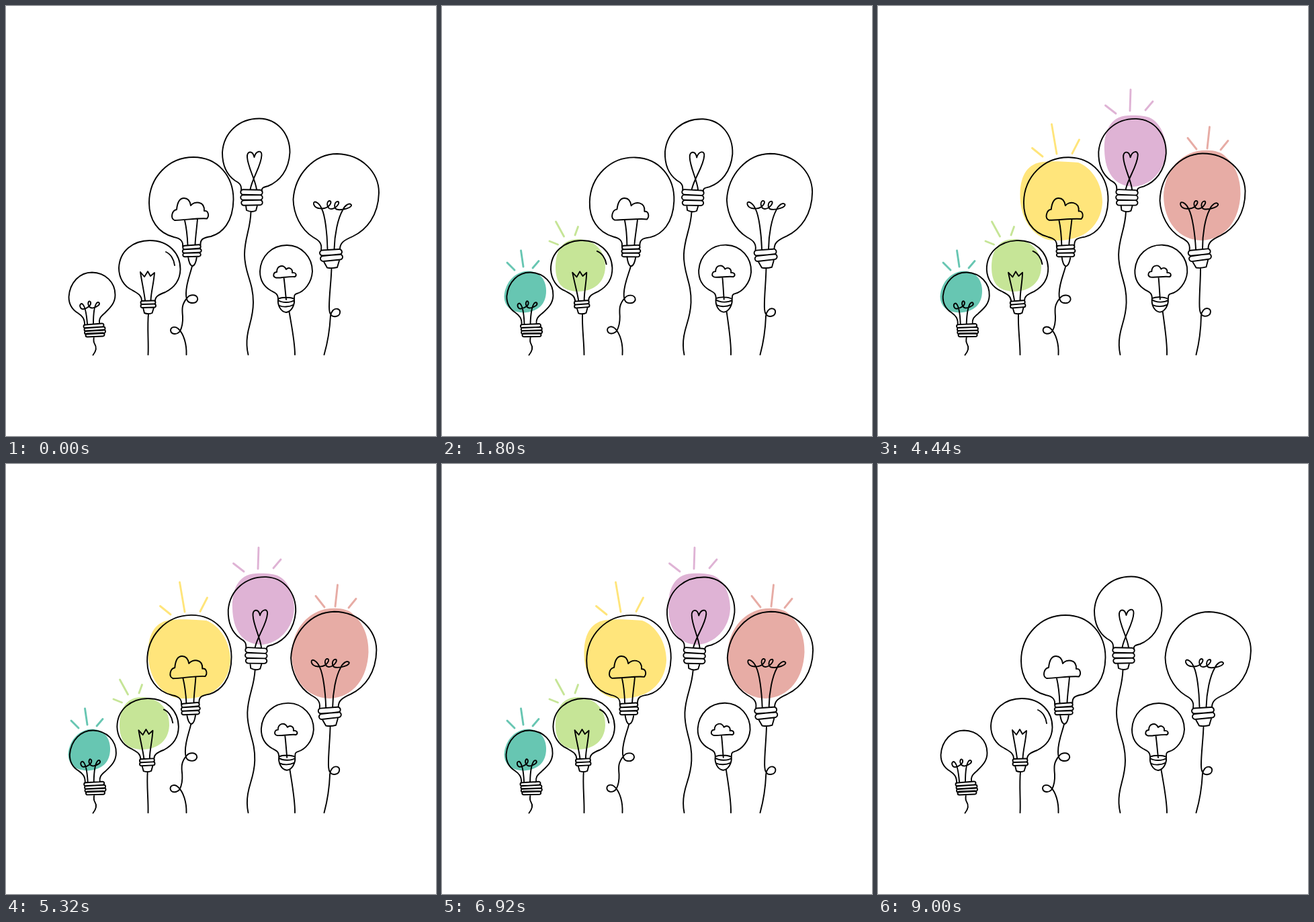
Write an HTML page with a canvas that moves like this. It is 640x640 px and loops after 9040 ms.

```html
<!DOCTYPE html>
<html lang="en">
<head>
<meta charset="utf-8">
<title>Swaying bulbs</title>
<style>
html, body { margin: 0; width: 100%; height: 100%; overflow: hidden; background: #fff; }
canvas { display: block; width: 640px; height: 640px; }
</style>
</head>
<body>
<canvas id="stage" width="640" height="640"></canvas>
<script>
const ctx = document.getElementById('stage').getContext('2d');
const LOOP = 9040, END = 9000, SWING = 1500, GROUND = 519;

// Each bulb: foot x, lean in degrees every SWING ms, outline, socket rings [x1, y1, x2, y2, height].
const bulbs = [
  {
    foot: 130,
    lean: [0, 2.1, 0, 2.1, 0, 2, 0],
    lines: `M117 475C117.5 465 113 461 107 457C97 451 93.5 442 93.5 433C95 411 110 396.5 128 396.5
      C148 397 162.5 411 162.5 430C162.5 443 154 450 147 457C140 463 138 466 139 473
      M121 473C120 460 118 446 113 443C108 443 110 452 115 451C121 450 127 446 126 441
      C124 437 121 441 123 446C126 452 133 449 137 446C141 443 138 439 135 442C131 447 130 460 130 473
      M131 492C130 497 130 500 132 503C136 509 133 515 129.5 519.5`,
    rings: [[118, 477, 143, 475, 5], [119, 481.5, 145, 480, 5], [119.5, 486, 145.5, 484.5, 5], [121, 490, 144, 489, 5]]
  },
  {
    foot: 211.5,
    lean: [0, -3, 0, -2.8, 0, -1.7, 0],
    lines: `M202 439C202 430 196 428 188 423C175 417 168 404 168 390C169 364 190 349 214 349
      C242 349 259.5 368 259.5 392C259 410 249 420 237 426C226 430 222 433 222 439
      M238 366C245 369 250 377 251 386
      M207 438C205.500 425 202 410 200 396L206 403L211 395L215 402L221 397C220 412 216 425 215.5 438
      M204 449L206 457C210 458.5 214 458.5 217.5 457L220 449
      M212 458C210 478 212.5 500 211.5 519`,
    rings: [[203, 441.5, 220, 441, 5], [203, 446.5, 220.5, 446, 5]]
  },
  {
    foot: 268.5,
    lean: [0, 2, -1, 1, -2, 1.8, 0],
    lines: `M263 358C264 350 260 346 250 344C226 338 213 318 213 293C213 255 242 225 279 225
      C315 225 338.5 253 338.5 288C338 322 322 338 305 343C293 345 289 347 289.5 356
      M251 319C244 316 247 304 254 303C255 292 258 286 265 286C272 286 274 291 275 297
      C280 290 296 290 295 305C301 304 303 312 299 316.5C290 315 263 319 251 319
      M266 319C269 332 270 344 270.5 356M285 317C284 330 282 343 281.5 355
      M271 373C272 380 274 386 277 387C281 387 283 380 284 373
      M277 387C275 397 268 412 268 428C268 440 272 442 278 442C284 442 286 437 285 434.5
      C283 429 274 429 270 434C261 444 262 452 263 462C263.5 472 262 478 259 484
      C254 490 246 489 245 483C245 478 251 476 256 480C265 488 269 504 268.5 519`,
    rings: [[266, 359.5, 287, 358, 5.5], [265.5, 365, 288, 364, 5.5], [266, 370.5, 287, 370, 5.5]]
  },
  {
    foot: 360.5,
    lean: [0, 2, 0.85, 1.2, 2, 2.7, 0],
    lines: `M350 275C351 266 347 263 341 260C328 251 322 237 322 218C324 188 347 167.5 377 167.5
      C404 168 422.5 190 422.5 218C421 245 407 261 390 268C382 270 380 271 381 276
      M373 273C371 258 360 240 359 225C358 216 367 214 369.5 225C372 215 381 214 380.5 222
      C380 238 367 255 363.5 273
      M357 297L358 304C363 306.5 368 306.5 372 304.5L374 297
      M364.5 306C364 332 355 345 355 370C355 398 368 410 368 441C368 470 357 480 358.5 505
      C358.7 510 359.5 515 360.5 519`,
    rings: [[353, 277, 378, 277.5, 7.5], [353, 285, 378, 285, 7.5], [354, 293, 378, 292.5, 7.5]]
  },
  {
    foot: 474,
    lean: [0, -1, 0, -2, 0, -1, 0],
    lines: `M469 363C471 352 464 348 457 344C438 332 428 309 427.5 288C430 250 459 220 493 220
      C530 221 555 248 555 278C554 312 537 333 516 343C502 349 497 353 497 362
      M478.5 362C478 338 475 312 470 302C466 292 457 288 458 295C460 303 474 303 480 298
      C485 293 484 290 481 290C476 292 478 303 485 302C492 301 498 292 494 291
      C488 291 487 303 494 303C502 304 515 300 514 296C511 292 504 297 501 304C494 316 489 340 488.5 362
      M473 380.5L478 389.5C483 390.5 489 390 493 389L496 379
      M484.5 390C484 410 481 430 481 448C481 460 485 463 491 462C498 461 499 453 494 451
      C488 449 484 455 483 461C482 480 479 500 473.5 519`,
    rings: [[471, 367.5, 496, 366, 8], [472, 376, 497, 373.5, 8]]
  },
  {
    foot: 430,
    lean: [0, 2.1, 0, 2, 0, 1.8, 0],
    lines: `M405 437C405 428 401 427 395 424C384 418 378 408 378 395C379 372 396 356 418 356
      C440 356 456 374 456 395C455 412 444 425 433 428C429 429 429 431 429 436
      M402 404.5C396 403 398 396 403 396C403 386 413 384 417 392C421 388 427 391 426 397
      C432 396 433 401 430 403C422 402 410 405 402 404.5
      M413.5 404C415 415 416 428 417 437
      M405 436C411 433 423 433 429 436M405 436C404 444 408 455 417 456C425 455 430 445 429 436
      M405 438C411 442 423 442 429 438M407 446C412 448.5 422 448 427 445
      M421.5 455C425 476 430 500 430 519`,
    rings: []
  }
];

// Colour patches with their rays, in order of lighting up.
const glows = [
  {
    on: 520, color: '#67c6b2',
    blob: `M92.5 432C94 410 110 395 128 394.5C146 395 155 408 155 424C155 444 143 455 122 456.5
      C106 456 93 450 92.5 432Z`,
    rays: 'M97 382L108 393M117.5 364L121 388M144 379.5L135 390'
  },
  {
    on: 1210, color: '#c6e597',
    blob: `M169 388C169 362 181 347 202 347C227 348 243 363 243 389C242 412 226 424.5 202 425
      C178 424 169 412 169 388Z`,
    rays: 'M169.5 321L181.5 343M202.5 328.5L198 341M160 350L172.5 355'
  },
  {
    on: 1900, color: '#ffe57b',
    blob: `M211.5 280C212 250 224 234 246 232C262 230 288 232 298 233C318 240 334 265 334 292
      C333 318 317 336 300 343C285 349 263 351 250 347C226 338 211 312 211.5 280Z`,
    rays: 'M229.5 211.5L245 224M258.5 176L266 220M299.5 199L289 219.5'
  },
  {
    on: 2590, color: '#dfb3d5',
    blob: `M337 215C336 190 344 164 372 163C385 162.5 398 163 406 167C420 174 429 195 429 215
      C428 245 405 268 380 269C352 268 338 248 337 215Z`,
    rays: 'M338.5 148L354 160M376 124.5L375 156M409 142L398 155'
  },
  {
    on: 3280, color: '#e7aca5',
    blob: `M425 283C426 250 445 223 475 216C492 213 510 215 518 225C532 237 540 258 539.5 280
      C538 318 518 347 482 349C446 348 426 320 425 283Z`,
    rays: 'M461 196.5L474 213M493.5 180L490 212M521 200.5L510 214'
  }
];

function addRing(path, [x1, y1, x2, y2, h]) {
  const r = h / 2, a = Math.atan2(y2 - y1, x2 - x1);
  const ring = new Path2D();
  ring.arc(x1, y1, r, a + Math.PI / 2, a + Math.PI * 1.5);
  ring.arc(x2, y2, r, a - Math.PI / 2, a + Math.PI / 2);
  ring.closePath();
  path.addPath(ring);
}

for (const b of bulbs) {
  b.path = new Path2D(b.lines);
  b.rings.forEach(r => addRing(b.path, r));
}
for (const g of glows) {
  g.blobPath = new Path2D(g.blob);
  g.rayPath = new Path2D(g.rays);
}

function leanAt(keys, t) {
  const p = Math.min(t, END) / SWING;
  const i = Math.min(Math.floor(p), keys.length - 2);
  const ease = (1 - Math.cos(Math.PI * (p - i))) / 2;
  return keys[i] + (keys[i + 1] - keys[i]) * ease;
}

function draw(t) {
  ctx.fillStyle = '#fff';
  ctx.fillRect(0, 0, 640, 640);
  ctx.lineCap = ctx.lineJoin = 'round';

  ctx.lineWidth = 2.9;
  for (const g of glows) {
    if (t < g.on || t >= END) continue;
    ctx.fillStyle = ctx.strokeStyle = g.color;
    ctx.fill(g.blobPath);
    ctx.stroke(g.rayPath);
  }

  ctx.lineWidth = 1.9;
  ctx.strokeStyle = '#000';
  for (const b of bulbs) {
    ctx.save();
    ctx.translate(b.foot, GROUND);
    ctx.rotate(leanAt(b.lean, t) * Math.PI / 180);
    ctx.translate(-b.foot, -GROUND);
    ctx.stroke(b.path);
    ctx.restore();
  }
}

const start = performance.now();
function tick() {
  draw((performance.now() - start) % LOOP);
  requestAnimationFrame(tick);
}
tick();
</script>
</body>
</html>
```
